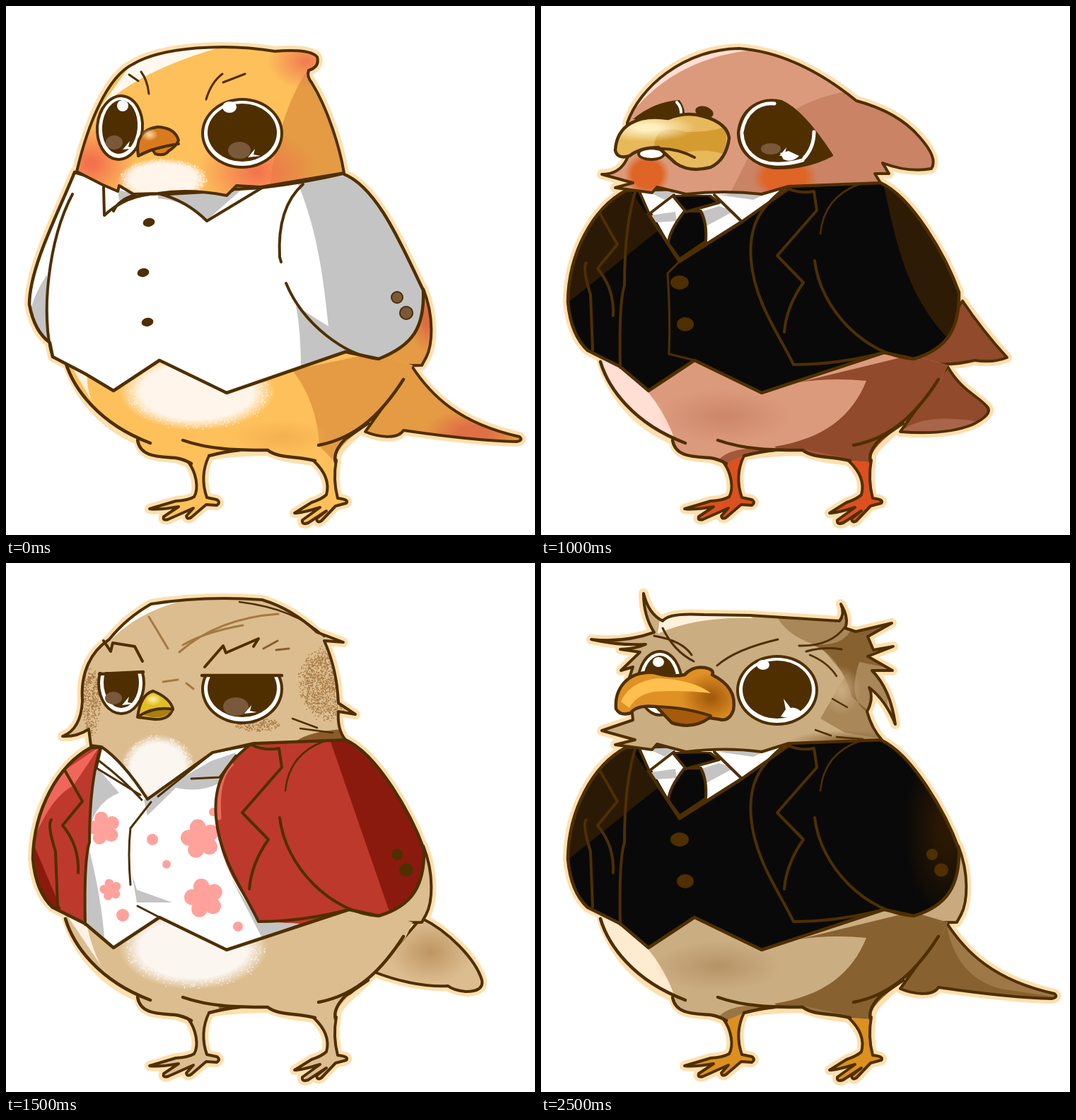
Write an HTML page with a canvas that moves like this. It is 748 px wide and 748 px high and loops after 3000 ms.

```html
<!DOCTYPE html>
<html lang="en">
<head>
<meta charset="utf-8">
<title>Six dressed birds</title>
<style>
html, body { margin: 0; width: 100%; height: 100%; overflow: hidden; background: #fff; }
canvas { display: block; width: 748px; height: 748px; }
</style>
</head>
<body>
<canvas id="stage" width="748" height="748"></canvas>
<script>
const ctx = document.getElementById('stage').getContext('2d');
const INK = '#4f2f00', HALO = '#ffdfae', GREY = '#c4c4c4', BLACK = '#090909';
ctx.lineJoin = ctx.lineCap = 'round';

// ---- drawing helpers ----
function fill(path, color) {
  ctx.fillStyle = color;
  ctx.fill(new Path2D(path));
}
function line(path, width = 4, color = INK) {
  ctx.lineWidth = width;
  ctx.strokeStyle = color;
  ctx.stroke(new Path2D(path));
}
function part(path, color) {
  fill(path, color);
  line(path);
}
function within(path, draw) {
  ctx.save();
  ctx.clip(new Path2D(path));
  draw();
  ctx.restore();
}
function oval(x, y, rx, ry, color, turn = 0) {
  ctx.fillStyle = color;
  ctx.beginPath();
  ctx.ellipse(x, y, rx, ry, turn, 0, 7);
  ctx.fill();
}
function glow(x, y, rx, ry, color, core = 0) {
  const g = ctx.createRadialGradient(0, 0, 0, 0, 0, 1);
  g.addColorStop(0, color);
  g.addColorStop(core, color);
  g.addColorStop(1, color + '00');
  ctx.save();
  ctx.translate(x, y);
  ctx.scale(rx, ry);
  oval(0, 0, 1, 1, g);
  ctx.restore();
}
function speckle(x, y, rx, ry, color, count = 1500) {
  let seed = 7;
  const rnd = () => (seed = seed * 16807 % 2147483647) / 2147483647;
  ctx.fillStyle = color;
  for (let i = 0; i < count; i++) {
    const a = rnd() * 6.283, r = Math.sqrt(rnd()) * (.75 + rnd() * .25);
    ctx.fillRect(x + Math.cos(a) * r * rx, y + Math.sin(a) * r * ry, 1.4, 1.4);
  }
}
function fluff(x, y, rx, ry, color = '#fff5ea') {
  glow(x, y, rx, ry, color, .72);
  speckle(x, y, rx, ry, color);
}

// ---- shared shapes ----
const BODY = 'M84 495C95 540 130 590 188 614C190 638 215 637 240 639L262 647L287 636Q310 630 370 629Q390 639 437 643L466 645C465 625 490 610 512 588L565 530L575 508L480 480Z';
const BODY_LINES = 'M84 503C95 540 130 590 204 618M186 614C190 638 215 637 240 639Q252 641 262 647M287 636Q310 630 330 628M250 614C290 628 330 628 370 628C385 640 410 636 437 643M466 645Q462 630 480 612L512 590M562 528C535 570 500 610 442 621';
const LEGS = [
  'M258 645C269 660 273 682 266 694Q258 699 240 700L203 711Q215 713 244 708L223 722Q221 728 229 726L265 710L255 721Q256 727 262 723L283 705L298 706Q304 702 298 698L284 695C277 675 278 655 287 636',
  'M435 643C453 660 457 677 453 691Q447 697 432 702L408 717Q418 717 444 709L419 727Q418 734 427 731L453 714L439 725Q440 732 446 728L466 707L481 703Q486 698 469 696Q462 670 467 642'
];
const WING = 'M590 400C606 440 603 480 594 497L588 508Q550 510 525 500L560 470Z';
const LONG_WING = 'M596 417Q625 460 659 497Q640 505 613 501Q570 512 525 501L560 470Z';
const LONG_TAIL = 'M573 508C600 550 640 590 726 609Q732 614 722 616C670 615 610 607 562 600C555 612 530 611 508 602L545 550Z';
const SUIT = 'M120 261C73 286 39 350 38 418Q42 465 66 487L112 510L152 544L217 501L312 547L485 490L527 499C575 485 592 455 591 405C573 355 525 270 480 250L350 255Z';
const SHIRT = 'M97 235C75 290 33 370 33 422Q40 460 62 476L66 496L112 520L152 544L217 501L312 547L480 489L527 499C575 480 592 455 590 402C560 340 525 255 476 237Q420 250 360 257L200 266Z';
const CENTER = 'M134 260Q118 310 118 395Q110 420 112 511L152 544L217 501L312 547L415 510L357 507C340 470 297 430 297 350Q298 295 345 257Z';
const SUIT_LINES = 'M134 260Q118 310 118 395Q110 420 112 511M345 257C310 285 293 310 297 360C302 420 340 470 357 507Q420 507 485 490M386 262L390 289L334 353L371 391Q347 425 344 461M386 262Q365 266 347 257M387 360C395 430 460 495 527 499M83 293L108 337L80 371Q104 400 102 438M64 363Q58 370 70 408L73 486';
const BIG_BEAK = 'M106 206C104 180 120 152 160 155Q185 162 203 158Q215 145 232 148Q246 151 242 158C265 170 276 185 272 208Q266 225 252 221L238 219Q215 236 185 226L163 203Q135 200 127 212Q112 217 106 206Z';
const BODY_SHADE = 'M365 532Q410 525 460 530C440 580 400 612 330 623L380 660H480L620 600V470Z';
const BODY_LIGHT = 'M80 495L118 514Q170 555 190 616L90 600Z';
const LEG_SHADE = 'M245 650Q260 620 330 626L290 650ZM370 626L435 640L400 642Z';

// ---- faces ----
function eye(x, y, rx, ry, lid = 0, turn = 0) {
  ctx.save();
  ctx.beginPath();
  ctx.rect(0, lid, 748, 748);
  ctx.clip();
  oval(x, y, rx, ry, INK, turn);
  oval(x, y, rx - 4, ry - 4, '#fff', turn);
  oval(x, y - 1, rx - 9, ry - 9, INK, turn);
  ctx.restore();
}
function sparkle() {
  fill('M343 192L353 205Q360 203 369 211Q356 222 339 217L346 207Z', '#fff');
}
function iris(x, y, rx, ry) {
  oval(x, y, rx, ry, '#79593a');
  fill(`M${x + 12} ${y + 10}L${x + 22} ${y - 2}L${x + 20} ${y + 6}L${x + 30} ${y + 8}Z`, '#fff');
}
function bigBeak(base, shade, light) {
  fill(BIG_BEAK, base);
  within(BIG_BEAK, () => {
    glow(240, 190, 42, 36, shade, .1);
    fill('M163 203Q200 203 240 216L235 235H180Z', shade);
    fill('M113 196Q125 168 165 163Q215 165 240 184Q200 179 160 182Q135 186 125 205Z', light);
  });
  line(BIG_BEAK, 4.5);
  line('M163 203C185 204 205 205 240 216', 4);
}

// ---- clothes ----
function cuffs(color = INK) {
  oval(553, 412, 8, 8, color);
  oval(566, 434, 10, 9.5, color);
}
function collar() {
  fill('M137 258L153 294L188 267L245 267L284 305L352 257L300 252H150Z', '#fff');
  fill('M150 262L190 262L175 274ZM250 267L335 258L300 274Z', GREY);
  line('M137 258L153 294L188 267M245 267L284 305L352 257');
}
function suitLines() {
  line(SUIT, 4.5);
  line(SUIT_LINES);
  line('M450 252Q400 270 395 322', 2.5);
}
function blackSuit(open) {
  fill(SUIT, BLACK);
  within(SUIT, () => {
    fill('M30 426L165 318L120 250H30Z', '#2a1904');
    if (open) fill('M485 255C505 350 520 410 575 470L610 400L540 250Z', '#2d1b06');
    else glow(575, 375, 62, 130, '#2a1804', .2);
  });
  fill('M137 258L196 361L284 305L352 257Z', '#fff');
  fill('M155 296L190 291L192 304L162 306ZM226 291L252 283L273 290L232 312Z', GREY);
  part('M203 290Q181 318 180 336L196 358L233 333Q235 307 226 290Z', BLACK);
  part('M186 268L205 291L252 278L237 267Z', BLACK);
  collar();
  suitLines();
  line('M152 294L196 361L284 305', 5);
  if (open) line('M196 361L179 378Q183 440 181 492L217 501', 3);
  oval(196, 391, 13, 10, INK);
  oval(204, 450, 12, 10, INK);
  if (!open) cuffs();
}
function whiteShirt() {
  fill(SHIRT, '#fff');
  within(SHIRT, () => {
    fill('M410 245C443 320 450 400 456 453L410 424Q417 460 417 515H620V230Z', GREY);
    fill('M58 380Q38 410 34 435L62 480Z', GREY);
    fill('M215 265L335 258L310 280L284 303Q255 275 215 272ZM158 260L180 265L160 275Z', GREY);
  });
  line(SHIRT, 4.5);
  line('M94 266C60 330 48 440 66 496M420 252Q383 285 387 355L389 362M396 392C420 450 480 495 527 499M138 256L139 296Q170 267 215 265Q255 275 284 304L362 257M152 290Q158 275 182 267M230 266L320 261');
  for (const [x, y] of [[202, 306], [194, 377], [200, 447]]) oval(x, y, 8.5, 6, INK, -.2);
  cuffs('#79593a');
  line('M545 412a8 8 0 1 0 16 0a8 8 0 1 0-16 0M557 434a9 9 0 1 0 18 0a9 9 0 1 0-18 0', 2);
}
function flower(x, y, size) {
  for (let i = 0; i < 5; i++) {
    const a = i * 1.2566 - 1.8;
    oval(x + Math.cos(a) * size * .62, y + Math.sin(a) * size * .62, size * .42, size * .42, '#ffa29b');
  }
  oval(x, y, size * .55, size * .55, '#ffa29b');
}
function redJacket() {
  fill(SUIT, '#bd392c');
  within(SUIT, () => {
    fill('M458 250L548 510H620V240Z', '#8a1a0e');
    fill('M38 395L78 490L30 480Z', '#8a1a0e');
    fill('M132 260L83 293Q45 340 42 385Q65 330 95 315Z', '#ef675a');
  });
  fill(CENTER, '#fff');
  within(CENTER, () => {
    fill('M125 285L160 325Q120 340 115 395Q135 470 140 540L105 510L110 290Z', GREY);
    fill('M200 357L240 318Q275 325 300 312L325 268L290 280L195 335ZM318 445L362 530L420 510L357 507ZM178 440L185 462L235 480L185 480Z', GREY);
    flower(138, 375, 23);
    flower(275, 390, 27);
    flower(148, 462, 15);
    flower(280, 474, 27);
    for (const [x, y, r] of [[207, 391, 8], [227, 426, 6], [165, 498, 9], [328, 514, 7], [293, 352, 6]]) oval(x, y, r, r, '#ffa29b');
  });
  line('M318 285Q297 305 301 360', 7, '#ef675a');
  suitLines();
  line('M205 338L176 375Q172 410 176 455M186 485L217 501', 3);
  cuffs();
}
function plaid() {
  for (let i = -4; i < 9; i++) {
    const x = 60 + i * 76;
    line(`M${x} 250Q${x + 75} 380 ${x + 210} 500M${x + 30} 510Q${x + 125} 420 ${x + 160} 255`, 9, '#5e402b88');
  }
}
function plaidJacket() {
  fill(SUIT, '#9b7b64');
  within(SUIT, () => {
    fill('M430 240V365Q450 400 425 420L414 425L417 510H620V240Z', '#825334');
    fill('M40 340L85 400L112 520L30 490Z', '#825334');
    plaid();
  });
  fill(CENTER, '#fff');
  within(CENTER, () => {
    fill('M120 290L160 293L180 305Q140 315 120 370ZM235 290L300 305V320Q260 322 235 312ZM318 445L362 530L420 510L357 507Z', GREY);
    line('M197 430L198 495L217 503', 7, GREY);
  });
  const tie = 'M206 290Q165 350 166 400L195 432L239 408Q242 340 232 295Z';
  fill(tie, '#9b7b64');
  within(tie, () => {
    fill('M205 285L230 345L242 350V285Z', '#825334');
    plaid();
  });
  line(tie);
  part('M186 270L205 293L256 280L240 267Z', '#825334');
  collar();
  suitLines();
  cuffs();
}

// ---- the birds ----
const birds = [
  {
    skin: '#fdc05b', dark: '#e49b43', legs: '#fdc05b', tail: LONG_TAIL, suit: SHIRT, clothes: whiteShirt,
    head: 'M100 234C115 170 142 100 180 82C220 58 310 52 380 64Q430 60 440 72Q444 86 428 91Q425 100 432 108C455 145 472 200 478 236L360 256L326 254L312 268Q260 258 215 265L180 266L160 254L158 262L135 252Z',
    body() {
      fill('M405 515Q440 560 443 622L480 660L620 600V470Z', this.dark);
      fill('M84 495L115 515Q113 550 128 570Z', '#fff1df');
      glow(390, 610, 70, 25, '#f4b14f');
      fluff(270, 545, 110, 55);
    },
    tailTint() { glow(660, 605, 70, 35, '#df6f45', .3); },
    wingTint() { glow(596, 440, 28, 50, '#dd6a43', .2); },
    shade() {
      fill('M180 78Q245 55 305 58Q190 90 132 145Z', '#fff8ee');
      fill('M428 88Q385 150 372 262H490V80Z', this.dark);
      glow(355, 235, 85, 60, '#f3714d');
      glow(120, 222, 65, 58, '#f3714d', .1);
      glow(425, 78, 55, 40, '#f07a50');
      fluff(222, 245, 64, 30);
    },
    face() {
      eye(334, 180, 58, 50);
      eye(161, 172, 34, 47, 0, .08);
      iris(330, 204, 16, 12);
      iris(153, 193, 12, 10);
      oval(316, 143, 10, 8, '#fff');
      oval(165, 141, 8, 8, '#fff');
      part('M187 212Q181 176 214 171Q239 172 244 190Q241 198 230 205Q224 213 211 209L207 203Z', '#d97a20');
      glow(203, 182, 12, 9, '#ffd9a6');
      line('M187 212Q205 201 244 195');
      line('M283 132Q290 108 306 96M307 108L338 96M202 124Q200 105 191 93M187 106L174 97', 3);
    }
  },
  {
    skin: '#956e3e', dark: '#956e3e', legs: '#956e3e', suit: SUIT, clothes: () => blackSuit(false),
    tail: 'M573 508C595 545 625 570 660 576L683 573C650 595 580 605 508 597L545 550Z',
    head: 'M128 112L126 88Q130 77 150 75Q200 66 260 71L470 90Q525 85 563 74Q535 100 490 111Q507 125 517 146Q495 130 470 138C462 170 470 220 484 250L350 255L312 266Q260 260 205 267L164 256L157 264L103 257L133 248L87 238Q115 238 132 222L120 165L124 145L102 128Q118 132 135 125Z',
    body() {
      fill('M80 495L112 511L152 546L167 540Q190 610 260 622V660H90Z', '#ffe0ba');
      glow(420, 570, 100, 45, '#a68658');
    },
    legTint() {
      fill('M255 635L282 640L270 675L272 698L205 710L260 690Z', '#ffe0ba');
      fill('M435 638L450 642L458 675Z', '#ffe0ba');
    },
    tailTint() { fill('M573 508Q600 575 650 577L690 570L620 520Z', '#c9a97e'); },
    wingTint() { fill(WING, '#c9a97e'); },
    shade() {
      fill('M122 120Q180 78 470 93L460 70L140 65Z', '#ffe0ba');
      fill('M465 140Q445 155 432 210Q440 235 478 242Z', '#bd9d74');
      glow(440, 220, 45, 35, '#b08e62');
      glow(440, 255, 90, 18, '#6f4b20');
    },
    face() {
      eye(334, 178, 58, 50, 160);
      line('M277 160H390');
      eye(162, 178, 34, 41, 144);
      sparkle();
      bigBeak('#e29323', '#9a560c', '#ffc55d');
      line('M258 139Q310 130 355 114M270 143Q350 122 395 119M370 131L448 126M134 121Q165 120 198 136M150 111Q180 115 208 132', 3);
      line('M380 232L410 234M390 242L420 246', 2.5);
    }
  },
  {
    skin: '#dc9a7c', dark: '#914a2b', legs: '#dd501f', suit: SUIT, clothes: () => blackSuit(true), wing: LONG_WING,
    tail: 'M575 510C595 545 620 552 632 568Q638 578 610 592C580 604 545 605 508 602L545 550Z',
    head: 'M122 165C140 115 200 62 280 60C350 65 410 105 446 134Q505 150 535 185Q562 215 552 230Q520 236 483 222L492 237L472 237L480 250L350 255L312 266Q260 260 205 266L164 256L157 264L105 257L130 250L86 238Q112 238 122 215Z',
    body() {
      fill(BODY_SHADE, this.dark);
      fill(BODY_LIGHT, '#ffded3');
      glow(260, 580, 95, 40, '#cc866a');
      fill(LEG_SHADE, '#a4593a');
    },
    tailTint() { fill('M505 605Q540 570 640 592L600 620Z', '#a9654a'); },
    shade() {
      fill('M118 165Q180 75 300 62L250 50L110 90Z', '#ffded3');
      fill('M450 118Q350 130 300 200L265 270H570V120Z', '#ca8365');
      glow(345, 243, 46, 30, '#df6527', .65);
      glow(150, 238, 32, 30, '#df6527', .65);
    },
    face() {
      part('M279 178C283 145 310 128 340 135Q370 148 411 211Q375 230 330 229C300 225 278 205 279 178Z', INK);
      line('M284 178C289 148 310 136 330 138M284 180C285 205 305 222 330 223Q350 224 370 218M386 178Q386 200 372 215', 5, '#fff');
      iris(325, 202, 14, 8);
      fill('M338 208L350 205L365 212Q355 222 343 217Z', '#fff');
      fill('M130 160Q160 135 196 133Q205 145 203 160Z', INK);
      line('M192 136Q199 143 198 154', 4, '#fff');
      oval(156, 209, 20, 10, INK);
      oval(156, 209, 16, 6, '#fff');
      const beak = 'M105 204C107 170 135 152 180 159Q205 149 230 156Q264 166 266 187Q262 217 240 228Q210 236 190 222L166 200Q140 200 125 212Q108 217 105 204Z';
      fill(beak, '#e7b95b');
      within(beak, () => {
        fill('M160 200Q160 165 205 178Q245 178 262 170V210Q230 200 200 208Z', '#d49b31');
        glow(150, 172, 70, 20, '#fff0c4', .2);
      });
      line(beak, 4.5);
      line('M163 202Q190 200 217 214');
      oval(231, 150, 13, 8, INK, .3);
    }
  },
  {
    skin: '#dcbd8f', dark: '#dcbd8f', legs: '#dcbd8f', suit: SUIT, clothes: redJacket,
    tail: 'M587 502C625 520 664 560 673 590Q676 606 650 606Q632 604 625 598C590 600 550 590 520 578L550 545Z',
    head: 'M120 258L117 235Q100 246 80 245Q106 235 108 195C105 155 120 125 146 108Q170 78 205 58Q280 46 362 52Q405 65 440 98L477 112L450 110Q468 150 470 198L494 214L470 210Q468 235 480 250L350 255L292 268L200 334Q165 280 135 260Z',
    body() {
      fill('M84 495L115 515Q125 560 145 585Z', '#fff2e4');
      fluff(265, 545, 105, 58, '#fbf6f0');
      fill('M300 627L330 628L305 636ZM480 612L515 588L490 610Z', '#8b5c2b');
    },
    tailTint() { glow(600, 550, 60, 45, '#bf9562'); },
    wingTint() { fill('M460 490H540L530 505Z', '#8b5c2b'); },
    shade() {
      fill('M140 118Q180 70 255 52L200 48Z', '#fffaf2');
      speckle(455, 170, 45, 55, '#a67843', 1600);
      speckle(120, 195, 14, 50, '#a67843', 450);
      speckle(355, 228, 35, 10, '#a67843', 250);
      fluff(215, 290, 52, 48, '#fbf6f0');
      fill('M410 252Q430 238 475 235L485 252Z', '#8b5c2b');
    },
    face() {
      eye(334, 178, 58, 50, 158);
      eye(163, 170, 34, 45, 154);
      line('M277 159H390M132 157L194 154', 4.5);
      iris(325, 203, 18, 13);
      iris(152, 191, 12, 9);
      part('M186 218Q190 186 208 181Q232 191 236 206Q231 222 210 221Z', '#e1bd24');
      fill('M190 214Q212 204 234 209Q224 220 207 218Z', '#a87d13');
      glow(208, 193, 12, 9, '#fff3a2');
      line('M187 217Q210 202 236 207');
      line('M138 110L148 125L151 113L182 118L193 139M281 147L307 117L311 127L357 107L350 118', 4);
      line('M364 121L384 110M382 123L400 121', 3, '#8b5c2b');
      line('M245 126Q300 78 385 72M250 116Q280 98 335 88M222 168L243 165M202 76L229 121M255 170L265 178', 3, '#a67843');
      line('M330 55Q410 65 450 104M416 234L462 240M405 220L440 233', 2.5);
      line('M135 260L128 290L190 328M132 280Q165 305 192 335M345 258L292 268L215 330M325 272L302 303L262 305', 3);
    }
  },
  {
    skin: '#ff694b', dark: '#ab2915', legs: '#e84d36', tail: LONG_TAIL, suit: SUIT, clothes: plaidJacket, plain: true,
    head: 'M125 165L130 132C150 80 200 50 240 43Q278 30 303 3L292 31Q312 15 328 13L336 25C400 35 455 85 466 130Q472 175 469 197Q475 212 483 223L470 233L484 240L478 250L350 255L312 266Q260 260 205 266L164 256L135 254L133 250L118 245L128 215Z',
    body() {
      fill(BODY_SHADE, this.dark);
      fill(BODY_LIGHT, '#ffd8cc');
      glow(280, 600, 130, 30, '#f15035');
      fluff(260, 533, 100, 52, '#ffe5dd');
      fill(LEG_SHADE, '#b93622');
    },
    tailTint() { fill('M573 508Q600 580 650 600L735 615L640 560Z', '#d23c27'); },
    wingTint() { fill('M590 400L610 430L600 490L575 490Z', '#d23c27'); },
    shade() {
      fill('M322 8C350 40 440 135 414 262H500V20Z', this.dark);
      glow(168, 80, 60, 30, '#ffc6b7');
      fill('M128 135Q165 72 250 42L220 38L130 80Z', '#ffd8cc');
      fluff(222, 245, 56, 28, '#ffe5dd');
    },
    face() {
      eye(334, 180, 58, 50);
      eye(168, 170, 33, 47);
      oval(315, 146, 10, 9, '#fff');
      oval(314, 151, 6, 5, '#ff694b');
      oval(170, 140, 8, 6, '#fff');
      oval(166, 144, 6, 4, '#ff694b');
      sparkle();
      bigBeak('#c88726', '#bb741c', '#efbd72');
      line('M233 76Q234 52 262 38M266 62Q285 52 306 47', 3);
    }
  },
  {
    skin: '#cbad82', dark: '#886131', legs: '#dc901e', tail: LONG_TAIL, suit: SUIT, clothes: () => blackSuit(false),
    head: 'M124 165L130 147L113 152L140 126L112 122Q135 121 148 115Q110 117 71 108Q118 113 160 98Q145 75 145 43Q152 72 172 82Q180 70 230 73L295 74L422 82Q430 72 424 58Q436 78 430 92L445 97L496 85L462 104L470 123L498 118L462 132L497 152L468 152Q494 178 501 228Q488 195 464 176Q471 192 461 210Q468 235 482 250L350 255L312 267Q260 260 205 267L164 256L157 264L105 257L133 250L86 237L130 222Z',
    body() {
      fill(BODY_SHADE, this.dark);
      fill(BODY_LIGHT, '#ffebd0');
      glow(250, 570, 90, 35, '#b59367');
      fill(LEG_SHADE, '#9a7443');
    },
    tailTint() { fill('M573 508Q585 585 650 602L735 615L640 560Z', '#9e7947'); },
    wingTint() { fill(WING, '#c9a97e'); },
    shade() {
      fill('M165 100Q220 75 300 78L280 65H170Z', '#fff0dc');
      fill('M335 78Q350 105 395 118L430 160L395 220L430 240L490 250V75Z', '#a98759');
      fill('M380 115Q430 120 440 90L500 80L500 150L450 140Q430 200 470 215L440 190Q420 125 380 115Z', '#886131');
      glow(425, 180, 28, 35, '#cbad82');
      glow(430, 252, 80, 15, '#886131');
    },
    face() {
      eye(334, 180, 58, 50);
      eye(168, 170, 33, 47);
      oval(314, 144, 9, 7, '#fff');
      oval(166, 140, 8, 7, '#fff');
      sparkle();
      bigBeak('#df9125', '#a65b0c', '#ffc04f');
      line('M430 90Q410 118 365 117M375 125Q400 118 425 122M249 145Q275 122 335 108M172 92Q188 125 216 139M160 103Q200 110 213 130', 3);
      line('M380 130Q405 140 418 160M412 192L433 204M388 236L410 244M418 246L455 249', 2.5);
    }
  }
];

function drawBird(bird) {
  const wing = bird.wing || WING;
  ctx.fillStyle = '#fff';
  ctx.fillRect(0, 0, 748, 748);
  if (!bird.plain) {
    for (const shape of [bird.tail, wing, ...LEGS, BODY, bird.suit, bird.head]) line(shape, 14, HALO);
  }
  const tinted = (shape, color, tint) => {
    fill(shape, color);
    if (tint) within(shape, () => tint.call(bird));
    line(shape);
  };
  tinted(bird.tail, bird.dark, bird.tailTint);
  tinted(wing, bird.dark, bird.wingTint);
  for (const leg of LEGS) tinted(leg, bird.legs, bird.legTint);
  fill(BODY, bird.skin);
  within(BODY, () => bird.body());
  line(BODY_LINES, 4.5);
  bird.clothes();
  tinted(bird.head, bird.skin, bird.shade);
  bird.face();
}

let shown = -1;
function tick() {
  const now = Math.floor(performance.now() % 3000 / 500);
  if (now !== shown) drawBird(birds[shown = now]);
  requestAnimationFrame(tick);
}
tick();
</script>
</body>
</html>
```
